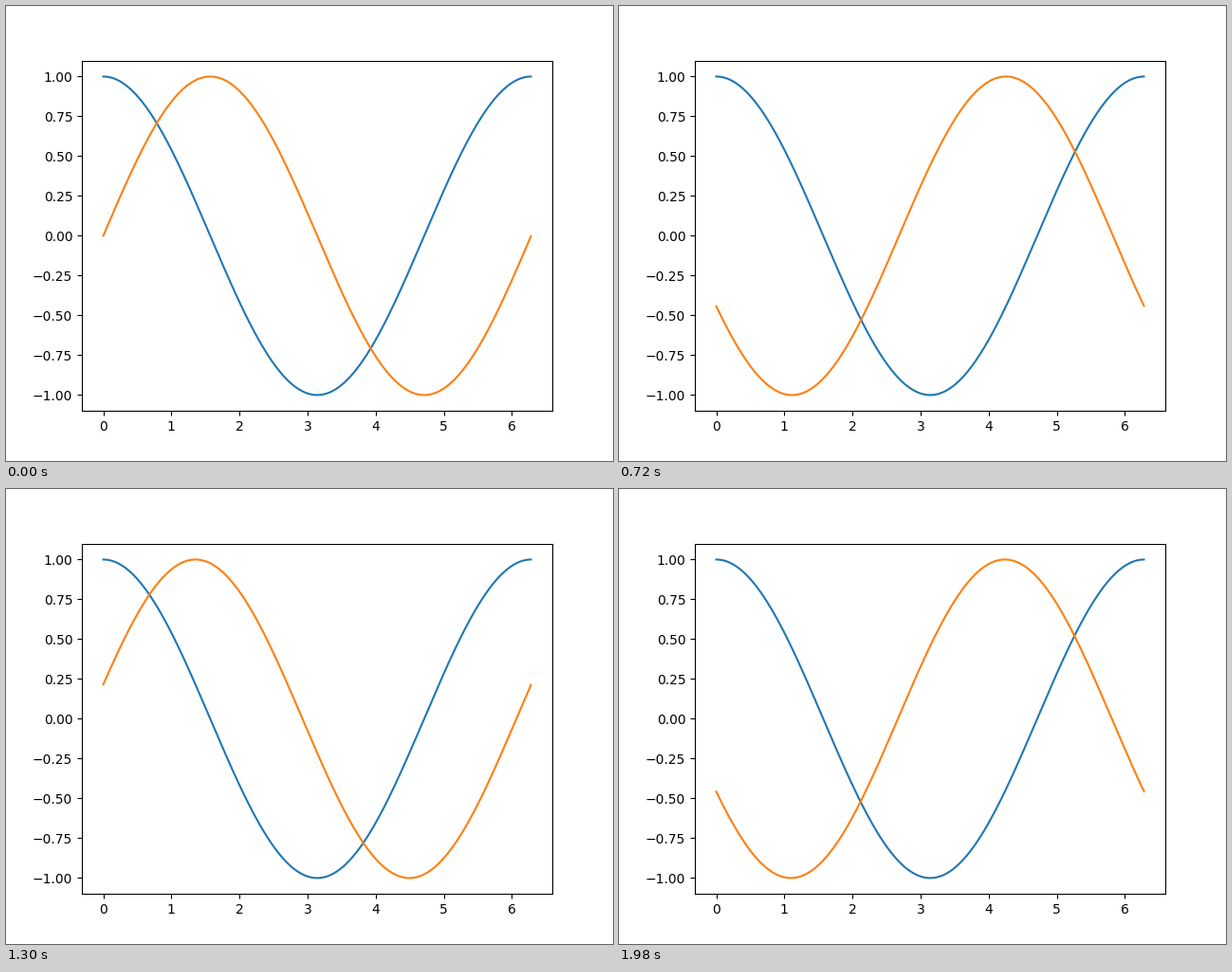
Animation, 640 px wide and 480 px high, one loop 2 s. Source, as a matplotlib script:

```python
import numpy as np
import matplotlib.pyplot as plt
from matplotlib.animation import FuncAnimation

FRAMES = 100
INTERVAL = 20  # ms
PHASE_STEP = 0.1  # radians per frame

fig, ax = plt.subplots(figsize=(6.4, 4.8), dpi=100)

x = np.arange(0, 2 * np.pi, 0.01)
ax.plot(x, np.cos(x), color="tab:blue")
wave, = ax.plot(x, np.sin(x), color="tab:orange")


def update(i):
    wave.set_ydata(np.sin(x + i * PHASE_STEP))
    return wave,


anim = FuncAnimation(fig, update, frames=FRAMES, interval=INTERVAL,
                     repeat=True, repeat_delay=0, blit=False)

plt.show()
```
